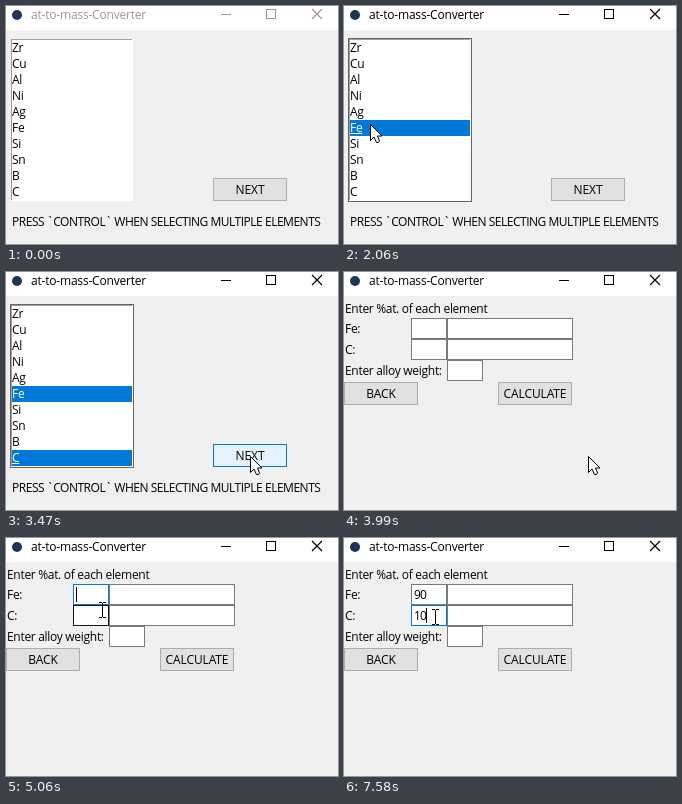
An HTML page with a canvas for the animation above (8 s loop, 332 by 238 pixels).

```html
<!DOCTYPE html>
<html lang="en">
<head>
<meta charset="utf-8">
<title>at-to-mass-Converter</title>
<style>
html, body { margin: 0; width: 100%; height: 100%; overflow: hidden; background: #f0f0f0; }
canvas { display: block; }
</style>
</head>
<body>
<canvas width="332" height="238"></canvas>
<script>
const LOOP = 8000, BLUE = '#0078d7';
const ENTER = 600, ACTIVATE = 1930, PICK = 2850, PRESS = 3860, PAGE = 3930;
const ELEMENTS = ['Zr', 'Cu', 'Al', 'Ni', 'Ag', 'Fe', 'Si', 'Sn', 'B', 'C'];
const FIELDS = [
  { name: 'Fe', value: '90', focus: 4605, type: 5780 },
  { name: 'C', value: '10', focus: 6670, type: 7380 }
];
const MOVES = [
  { from: ENTER, to: 1130, x: 34, y: 48 },
  { from: 1260, to: 1460, x: 30, y: 92 },
  { from: 1530, to: 1800, x: 26, y: 118 },
  { from: 2050, to: 2650, x: 17, y: 185 },
  { from: 3130, to: 3470, x: 244, y: 184 },
  { from: 4130, to: 4530, x: 95, y: 62 },
  { from: 5000, to: 5060, x: 96, y: 72 },
  { from: 6440, to: 6840, x: 91, y: 79 }
];

const ctx = document.querySelector('canvas').getContext('2d');
let mouse;

const ease = k => k * k * (3 - 2 * k);

function pointerAt(t) {
  if (t < ENTER) return null;
  let x = 242, y = 225;
  for (const m of MOVES) {
    const k = ease(Math.min(1, Math.max(0, (t - m.from) / (m.to - m.from))));
    x += (m.x - x) * k;
    y += (m.y - y) * k;
  }
  return { x: Math.round(x), y: Math.round(y) };
}

const over = (x, y, w, h) =>
  mouse && mouse.x >= x && mouse.x < x + w && mouse.y >= y && mouse.y < y + h;

function rect(x, y, w, h, fill) {
  ctx.fillStyle = fill;
  ctx.fillRect(x, y, w, h);
}

function box(x, y, w, h, border, fill) {
  rect(x, y, w, h, border);
  rect(x + 1, y + 1, w - 2, h - 2, fill);
}

function text(str, x, y, { track = -0.3, color = '#000', align = 'left' } = {}) {
  ctx.font = '12px "Open Sans", "Noto Sans", sans-serif';
  ctx.letterSpacing = track + 'px';
  ctx.textAlign = align;
  ctx.fillStyle = color;
  ctx.fillText(str, x, y);
}

function button(label, x, y, pressed) {
  const [border, fill] = pressed ? ['#005499', '#cce4f7']
    : over(x, y, 74, 23) ? [BLUE, '#e5f1fb'] : ['#adadad', '#e1e1e1'];
  box(x, y, 74, 23, border, fill);
  text(label, x + 37, y + 16, { track: -0.1, align: 'center' });
}

function entry(x, y, w, focused) {
  box(x, y, w, 21, focused ? BLUE : over(x, y, w, 21) ? '#171717' : '#7a7a7a', '#fff');
}

function titleBar(active) {
  const ink = active ? '#000' : '#999';
  rect(0, 0, 332, 24, '#fff');
  ctx.fillStyle = '#1d3557';
  ctx.beginPath();
  ctx.arc(11, 9, 5, 0, 7);
  ctx.fill();
  text('at-to-mass-Converter', 25, 13, { track: -0.2, color: ink });
  rect(215, 8, 10, 1, ink);
  box(260, 3, 10, 10, ink, '#fff');
  ctx.strokeStyle = ink;
  ctx.lineWidth = 1.2;
  ctx.stroke(new Path2D('M306 3l10 10m0-10l-10 10'));
}

function listPage(t) {
  const active = t >= ACTIVATE, picked = t >= PICK;
  if (active) rect(4, 32, 124, 164, '#646464');
  rect(5, 33, 122, 162, '#fff');
  rect(5, 33, 121, 1, '#a0a0a0');
  rect(5, 33, 1, 161, '#a0a0a0');
  ELEMENTS.forEach((name, i) => {
    const y = 34 + 16 * i;
    const selected = active && name === 'Fe' || picked && name === 'C';
    if (selected) rect(6, y, 120, 16, BLUE);
    text(name, 6, y + 12, { color: selected ? '#fff' : '#000' });
    if (active && name === (picked ? 'C' : 'Fe'))
      rect(6, y + 13, ctx.measureText(name).width, 1, '#fff');
  });
  button('NEXT', 207, 172, t >= PRESS);
  text('PRESS `CONTROL` WHEN SELECTING MULTIPLE ELEMENTS', 6, 220, { track: -0.48 });
}

function formPage(t) {
  const current = FIELDS.filter(f => t >= f.focus).pop();
  text('Enter %at. of each element', 1, 41);
  FIELDS.forEach((field, i) => {
    const y = 46 + 21 * i;
    const count = Math.max(0, Math.floor((t - field.type) / 140) + 1);
    const typed = field.value.slice(0, count);
    text(field.name + ':', 1, y + 15);
    entry(67, y, 36, field === current);
    entry(103, y, 126);
    text(typed, 70, y + 15, { track: -0.8 });
    if (field === current && (t - field.focus) % 900 < 600)
      rect(70 + 6 * typed.length, y + 3, 1, 15, '#000');
  });
  text('Enter alloy weight:', 1, 103);
  entry(103, 88, 36);
  button('BACK', 0, 110);
  button('CALCULATE', 154, 110);
}

function pointer(form) {
  if (!mouse) return;
  const { x, y } = mouse;
  if (form && (over(67, 46, 162, 42) || over(103, 88, 36, 21))) {
    rect(x, y - 7, 1, 14, '#000');
    for (const end of [y - 8, y + 7]) {
      rect(x - 3, end, 3, 1, '#000');
      rect(x + 1, end, 3, 1, '#000');
    }
    return;
  }
  ctx.save();
  ctx.translate(x + 0.5, y + 0.5);
  ctx.fillStyle = '#fff';
  ctx.strokeStyle = '#000';
  ctx.lineWidth = 1;
  const arrow = new Path2D('M0 0V16L3.5 12.5L6 18H8L9 16.5L7 11.5H11.5Z');
  ctx.fill(arrow);
  ctx.stroke(arrow);
  ctx.restore();
}

function draw() {
  const t = performance.now() % LOOP, form = t >= PAGE;
  mouse = pointerAt(t);
  rect(0, 0, 332, 238, '#f0f0f0');
  titleBar(t >= ACTIVATE);
  (form ? formPage : listPage)(t);
  pointer(form);
  requestAnimationFrame(draw);
}
draw();
</script>
</body>
</html>
```
